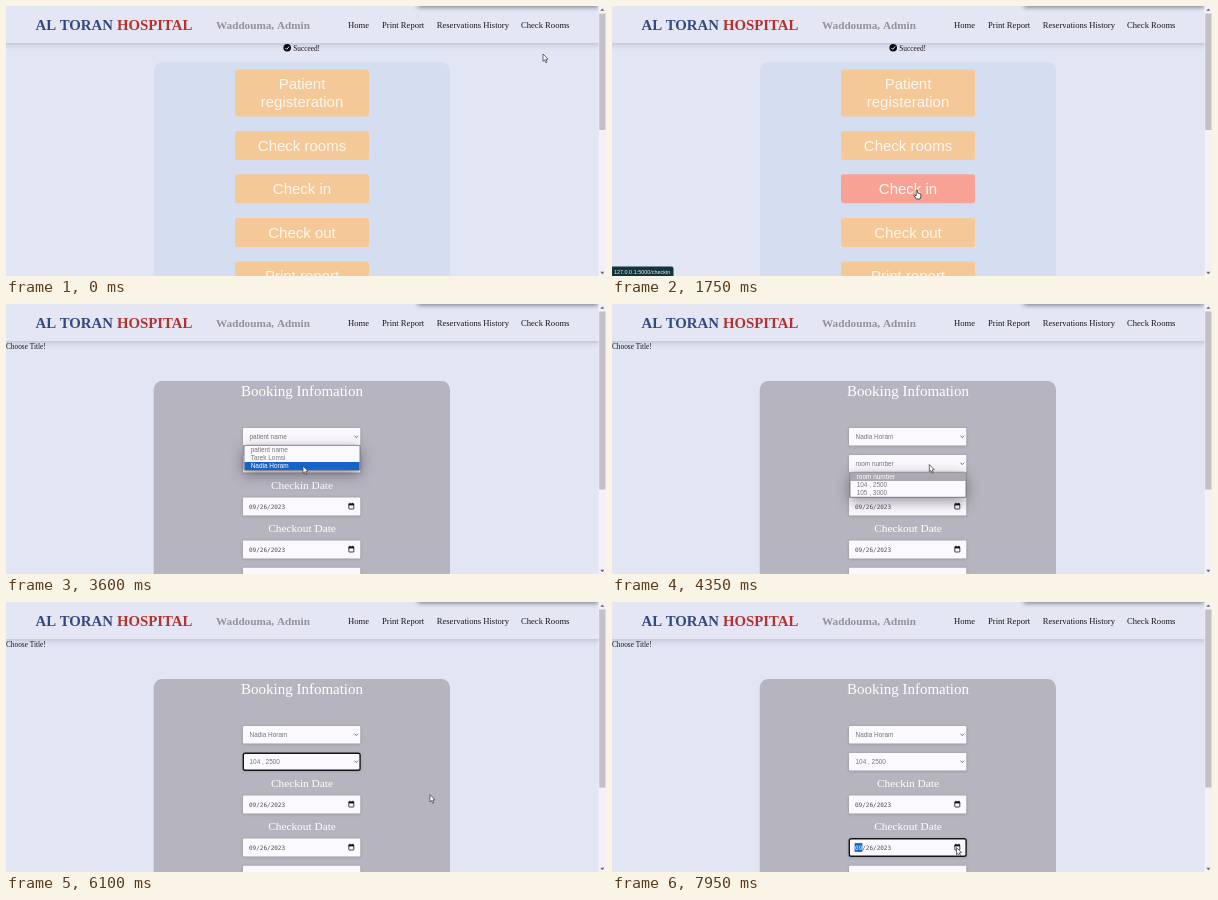
An HTML page with a canvas that plays this animation: 600x270 px, repeating every 8 s.

```html
<!DOCTYPE html>
<html lang="en">
<head>
<meta charset="utf-8">
<title>Hospital booking</title>
<style>
html, body { margin: 0; width: 100%; height: 100%; overflow: hidden; background: #e2e5f3; }
canvas { display: block; width: 600px; height: 270px; }
</style>
</head>
<body>
<canvas id="stage"></canvas>
<script>
const W = 600, H = 270, LOOP = 8000;
const SERIF = '"Liberation Serif", "Times New Roman", serif';
const SANS = '"Liberation Sans", Arial, sans-serif';
const MONO = '"DejaVu Sans Mono", monospace';
const PAPER = '#fcf9fe', INK = '#17171c', GREY = '#77757d', BLUE = '#1764c8';

const PATIENTS = ['patient name', 'Tarek Lomsi', 'Nadia Horam'];
const ROOMS = ['room number', '104 , 2500', '105 , 3000'];
const BUTTONS = [[63.5, 47, ['Patient', 'registeration']], [125, 29, ['Check rooms']],
  [168.3, 29, ['Check in']], [212, 29, ['Check out']], [255.5, 29, ['Print report']]];

// Moments of the session, in ms
const HOVER = 720, BOOKING = 1850, OPEN1 = 2300, PICK1 = 3700, OPEN2 = 4200,
  PICK2 = 4680, DATE1 = 6550, PICK3 = 7300, DATE2 = 7750;

const PATH = [[0, 537, 48], [150, 537, 48], [800, 305, 184], [1850, 305, 184],
  [2250, 326, 124.5], [2550, 326, 124.5], [3400, 297, 162], [3700, 297, 162],
  [4150, 320, 159], [4300, 320, 159], [4600, 285, 179], [4700, 285, 179],
  [5100, 407, 134], [5200, 407, 134], [5600, 472, 165], [5950, 446, 190],
  [6450, 345, 202], [6650, 345, 202], [6800, 337, 202.5], [7200, 277, 155],
  [7350, 277, 155], [7700, 344.5, 245.5], [8000, 344.5, 245.5]];

const canvas = document.getElementById('stage');
const ctx = canvas.getContext('2d');
const dpr = window.devicePixelRatio || 1;
canvas.width = W * dpr;
canvas.height = H * dpr;

const clamp = v => Math.max(0, Math.min(1, v));
const ease = v => v * v * (3 - 2 * v);

function text(s, x, y, size, color, font = SERIF, align = 'left', weight = '') {
  ctx.font = `${weight} ${size}px ${font}`;
  ctx.textAlign = align;
  ctx.fillStyle = color;
  ctx.fillText(s, x, y);
}

function rect(x, y, w, h, color, r = 0) {
  ctx.fillStyle = color;
  ctx.beginPath();
  ctx.roundRect(x, y, w, h, r);
  ctx.fill();
}

function frame(x, y, w, h, color, r, line) {
  ctx.strokeStyle = color;
  ctx.lineWidth = line;
  ctx.beginPath();
  ctx.roundRect(x, y, w, h, r);
  ctx.stroke();
}

function shadow(color, blur, dy, draw) {
  ctx.save();
  ctx.shadowColor = color;
  ctx.shadowBlur = blur * dpr;
  ctx.shadowOffsetY = dy * dpr;
  draw();
  ctx.restore();
}

function line(points, color, width) {
  ctx.strokeStyle = color;
  ctx.lineWidth = width;
  ctx.beginPath();
  points.forEach(([x, y]) => ctx.lineTo(x, y));
  ctx.stroke();
}

function shape(points, fill, stroke, width) {
  ctx.beginPath();
  points.forEach(([x, y]) => ctx.lineTo(x, y));
  ctx.closePath();
  ctx.fillStyle = fill;
  ctx.fill();
  if (stroke) {
    ctx.strokeStyle = stroke;
    ctx.lineWidth = width;
    ctx.stroke();
  }
}

function pointerAt(t) {
  const i = Math.max(1, PATH.findIndex(k => k[0] > t));
  const [t0, x0, y0] = PATH[i - 1], [t1, x1, y1] = PATH[i];
  const k = ease(clamp((t - t0) / (t1 - t0)));
  return { x: x0 + (x1 - x0) * k, y: y0 + (y1 - y0) * k };
}

function drawHeader() {
  shadow('rgba(70,75,110,.3)', 6, 1, () => rect(-10, -10, 620, 47, '#e4e6f3'));
  text('AL TORAN', 29.5, 24, 14.8, '#304a7e', SERIF, 'left', 'bold');
  text('HOSPITAL', 111, 24, 14.8, '#b2322f', SERIF, 'left', 'bold');
  text('Waddouma, Admin', 210, 22.8, 11.2, '#92919c', SERIF, 'left', 'bold');
  text('Home', 342, 22, 8.6, INK);
  text('Print Report', 376, 22, 8.6, INK);
  text('Reservations History', 430.7, 22, 8.6, INK);
  text('Check Rooms', 515, 22, 8.6, INK);
  shadow('rgba(50,50,65,.65)', 5, 1, () => rect(412, -6, 180, 6, '#888'));
}

function drawScrollbar(end) {
  rect(592.5, 0, 7.5, H, '#f4f0f6');
  rect(593.2, 7.5, 6.3, end - 7.5, '#c4c0c8');
  shape([[594.3, 4.8], [598.3, 4.8], [596.3, 2.4]], '#6b6268');
  shape([[594.3, 265.8], [598.3, 265.8], [596.3, 268.2]], '#6b6268');
}

function drawMenuPage(t) {
  ctx.fillStyle = '#08080c';
  ctx.beginPath();
  ctx.arc(281.2, 41.8, 3.8, 0, 7);
  ctx.fill();
  line([[279.3, 41.9], [280.7, 43.3], [283.2, 40.5]], '#fff', 0.9);
  text('Succeed!', 287.3, 44.5, 7.3, INK);

  rect(148, 56, 296, 230, '#d5def1', 9);
  const hot = clamp((t - HOVER) / 180);
  const mix = (a, b) => Math.round(a + (b - a) * hot);
  BUTTONS.forEach(([y, h, lines], i) => {
    const fill = i === 2 ? `rgb(${mix(245, 248)},${mix(201, 162)},${mix(151, 150)})` : '#f5c997';
    rect(229, y, 134, h, fill, 2.5);
    const first = y + h / 2 + 5.2 - (lines.length - 1) * 9;
    lines.forEach((s, j) => text(s, 296, first + j * 18, 15, '#fdf6f0', SANS, 'center'));
  });
  if (t >= HOVER) {
    rect(-3, 260.5, 64.5, 13, '#12343d', 2);
    text('127.0.0.1:5000/checkin', 2, 267.7, 5.45, '#eef2f4', SANS);
  }
}

function drawBox(y, focus, h = 17.5) {
  shadow('rgba(70,65,85,.35)', 3, 0.5, () => rect(237, y, 117.3, h, PAPER, 1));
  if (focus) frame(237.3, y + 0.2, 116.8, h - 0.4, '#14141a', 1.8, 1.4);
}

function drawSelect(y, value, focus) {
  drawBox(y, focus);
  text(value, 243.5, y + 11, 6.45, GREY, SANS);
  line([[348.4, y + 7.6], [350.3, y + 9.6], [352.2, y + 7.6]], '#66646c', 0.9);
}

function drawDate(y, focus) {
  drawBox(y, focus, 18);
  if (focus) rect(242.6, y + 4.6, 7.8, 8.8, BLUE);
  text('09', 243, y + 11.2, 6, focus ? '#fff' : '#4c4a52', MONO);
  text('/26/2023', 250.2, y + 11.2, 6, '#4c4a52', MONO);
  frame(342.8, y + 6.5, 5, 5, '#111', 0.5, 0.8);
  rect(342.6, y + 6, 5.4, 1.9, '#111');
  rect(343.5, y + 5.2, 0.8, 1.2, '#111');
  rect(346.4, y + 5.2, 0.8, 1.2, '#111');
}

function drawList(y, items, p) {
  const h = items.length * 8 + 1;
  const over = p.x > 238 && p.x < 354 ? Math.floor((p.y - y - 0.6) / 8) : -1;
  const inside = over >= 0 && over < items.length;
  shadow('rgba(40,38,55,.5)', 14, 4, () => rect(238, y, 116, h, PAPER, 1.5));
  const lit = inside ? over : 0;
  rect(238.4, y + 0.6 + lit * 8, 115.2, 8, inside ? BLUE : '#aba8b1');
  items.forEach((s, i) =>
    text(s, 244.7, y + 6.9 + i * 8, 6.45, i === lit ? '#fff' : GREY, SANS));
  frame(238, y, 116, h, '#6d6a75', 1.5, 0.8);
}

function drawArrow(x, y, dir, color) {
  line([[x, y - 4 * dir], [x, y + 4 * dir]], color, 0.9);
  line([[x - 3.2, y + dir], [x, y + 4 * dir], [x + 3.2, y + dir]], color, 0.9);
}

function drawCalendar() {
  shadow('rgba(40,38,55,.5)', 10, 3, () => rect(238, 58.5, 101.5, 134, PAPER, 2));
  frame(238, 58.5, 101.5, 134, '#8d8a95', 2, 0.7);
  text('September 2023', 243, 72, 5.6, INK, SANS, 'left', 'bold');
  shape([[288, 68.8], [291.6, 68.8], [289.8, 71.2]], INK);
  drawArrow(313.4, 70, -1, '#b9b6bf');
  drawArrow(328, 70, 1, '#33323a');
  const column = i => 249.6 + i * 13.1;
  ['Su', 'Mo', 'Tu', 'We', 'Th', 'Fr', 'Sa'].forEach((d, i) =>
    text(d, column(i), 89.6, 5.7, '#34333b', SANS, 'center'));
  rect(269.8, 148.6, 12.1, 12.4, BLUE, 1);
  frame(269.8, 148.6, 12.1, 12.4, '#132748', 1, 1.1);
  // The grid starts on Sunday, 27 August
  for (let i = 0; i < 42; i++) {
    const day = new Date(2023, 7, 27 + i);
    const today = i === 30;
    const color = today ? '#fff' : i < 30 ? '#bdbac3' : i < 35 ? '#25242b' : '#6d6b74';
    text(day.getDate(), column(i % 7), 103 + Math.floor(i / 7) * 13.4, 5.7, color, SANS,
      'center', today ? 'bold' : '');
  }
  text('Clear', 248, 185.3, 5.6, '#2f66b4', SANS);
  text('Today', 314.8, 185.3, 5.6, '#2f66b4', SANS);
}

function drawBookingPage(t, p) {
  const during = (a, b) => t >= a && t < b;
  text('Choose Title!', 0, 44.8, 7.3, INK);
  rect(147.7, 77, 296.3, 220, '#b6b4be', 8.5);
  text('Booking Infomation', 296, 92, 15, '#fff', SERIF, 'center');
  drawSelect(124, PATIENTS[t < PICK1 ? 0 : 2], during(PICK1, OPEN2));
  drawSelect(151, ROOMS[t < PICK2 ? 0 : 1], during(PICK2, DATE1));
  text('Checkin Date', 296, 185, 11.35, '#fff', SERIF, 'center');
  drawDate(193.5, during(DATE1, DATE2));
  text('Checkout Date', 296, 228, 11.35, '#fff', SERIF, 'center');
  drawDate(236.5, t >= DATE2);
  drawBox(263.8, false);
  if (during(OPEN1, PICK1)) drawList(141.3, PATIENTS, p);
  if (during(OPEN2, PICK2)) drawList(168.3, ROOMS, p);
  if (during(DATE1, PICK3)) drawCalendar();
}

function drawPointer(p, hand) {
  ctx.save();
  ctx.translate(p.x, p.y);
  ctx.lineJoin = 'round';
  if (hand) {
    shape([[-0.8, 0.2], [0.5, 0.2], [0.7, 3], [3.8, 3.9], [3.9, 6.4], [3, 9],
      [-0.8, 9], [-3, 5.6], [-2.3, 4.9], [-0.9, 6]], '#fff', '#2a2a30', 0.8);
  } else {
    shape([[0, 0], [0, 7.3], [1.6, 5.9], [2.8, 8.6], [4, 8.1], [2.8, 5.4], [5, 5.2]],
      '#fff', '#45444c', 0.8);
  }
  ctx.restore();
}

function render(t) {
  const p = pointerAt(t);
  const menu = t < BOOKING;
  ctx.setTransform(dpr, 0, 0, dpr, 0, 0);
  rect(0, 0, W, H, '#e2e5f3');
  drawHeader();
  if (menu) drawMenuPage(t);
  else drawBookingPage(t, p);
  drawScrollbar(menu ? 124 : 185.5);
  drawPointer(p, menu && t >= HOVER);
}

const start = performance.now();
function tick() {
  render((performance.now() - start) % LOOP);
  requestAnimationFrame(tick);
}
tick();
</script>
</body>
</html>
```
